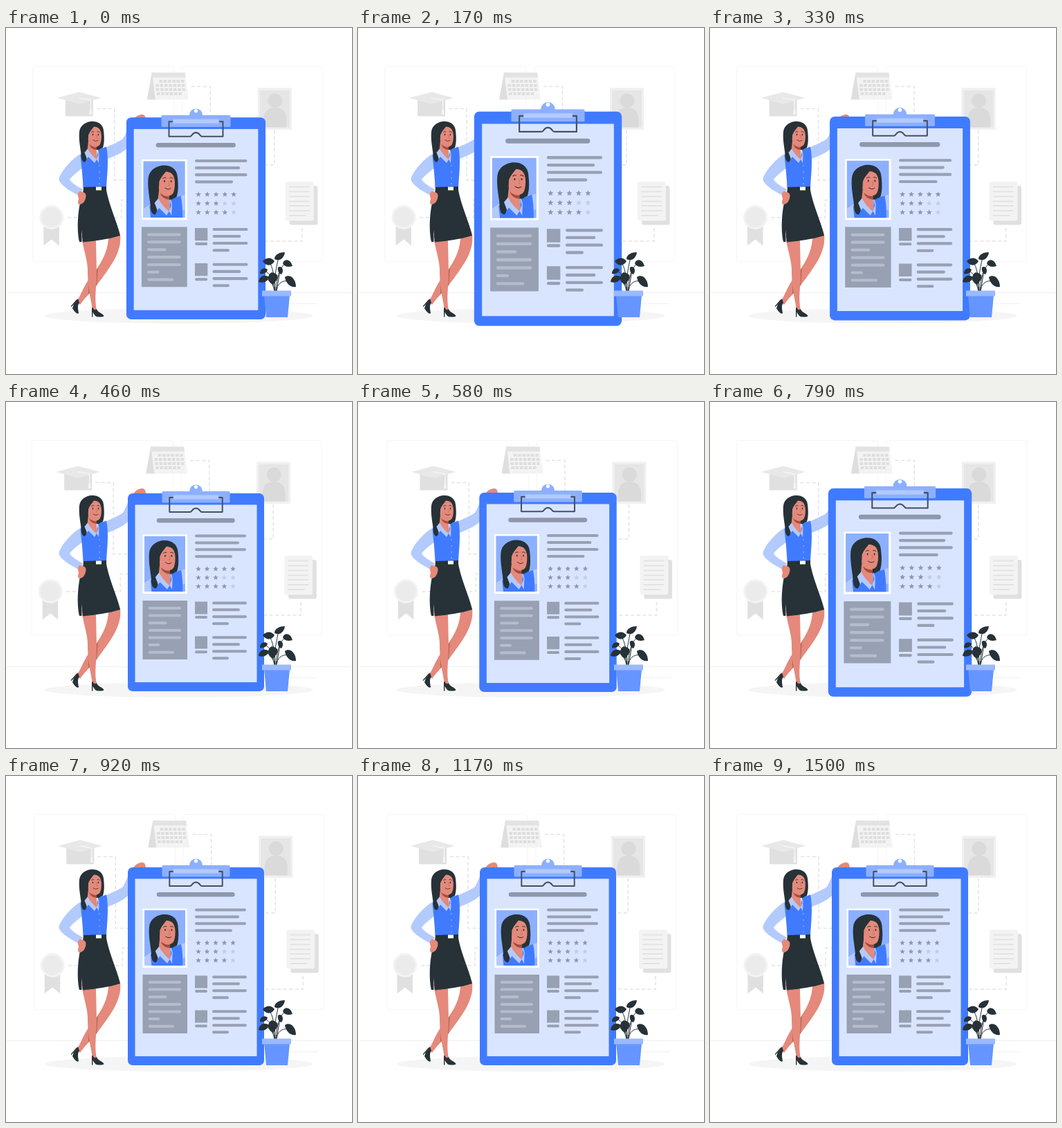
Recreate the animation shown at these times as an HTML page. Size 500 by 500 pixels, loop 1.54 s.

```html
<!DOCTYPE html>
<html lang="en">
<head>
<meta charset="utf-8">
<title>Resume illustration</title>
<style>
  html, body { margin: 0; width: 100%; height: 100%; overflow: hidden; background: #fff; }
  svg { display: block; width: 100%; height: 100%; }
  .line { fill: none; stroke-linecap: round; stroke-linejoin: round; }
  .dash { fill: none; stroke: #e3e3e3; stroke-width: 1.5; stroke-dasharray: 5 3.5; }
  .skin { fill: #e4897b; }
  .dark { fill: #263238; }
  .blue { fill: #407bff; }
  .sleeve { fill: #b3caff; }
  .grey { fill: #98a0b3; }
  .bars { stroke: #98a0b3; stroke-width: 4; }
</style>
</head>
<body>
<svg viewBox="0 0 500 500">
  <defs>
    <clipPath id="photo"><path d="M200 194h59v80h-59z"/></clipPath>
    <path id="star" d="M0-3.9 1.1-1.3 3.8-1.1 1.7.7 2.4 3.4 0 1.9-2.4 3.4-1.7.7-3.8-1.1-1.1-1.3Z"/>
  </defs>

  <g id="backdrop">
    <g fill="none" stroke="#f5f5f5">
      <rect x="39" y="55.5" width="204" height="282" rx="3"/>
      <rect x="255" y="55.5" width="203" height="282" rx="3"/>
      <path d="M0 382.5h500M380 398.5h69" stroke="#f0f0f0"/>
    </g>
    <path class="dash" d="M131 116.5h26V220h20M268 84.5h27.500V130M388 148v50h-17M89 274h78v-25.500h12M428 289v19h-58"/>

    <g id="cap">
      <path d="M86 103h40v24.500H86z" fill="#e0e0e0"/>
      <path d="M74 101 106 92.500 138 101 106 110Z" fill="#e8e8e8"/>
      <path class="line" d="M106 101 122.500 104V123" stroke="#f5f5f5" stroke-width="1.500"/>
      <path d="M121.500 117h2l1 8h-4z" fill="#f5f5f5"/>
    </g>

    <g id="calendar">
      <path d="M211 64.500 204 103.500H217L259 66Z" fill="#dedede"/>
      <path d="M212 70H259.500L264 103.500H216Z" fill="#f3f3f3"/>
      <path d="M211 64.500H259L260 71.500H210Z" fill="#e3e3e3"/>
      <path d="M221.500 77h36M216.500 83h42M217 89h42M218 95h36" fill="none" stroke="#dedede" stroke-width="4" stroke-dasharray="4.600 1.700"/>
    </g>

    <g id="portrait">
      <path d="M364 86.500h49V147h-49z" fill="#f0f0f0"/>
      <path d="M367 90h43v53.500h-43z" fill="#e6e6e6"/>
      <circle cx="389" cy="105" r="10.500" fill="#dadada"/>
      <path d="M372.500 143.500V131C373 121 379 115 389 115S405 121 405.500 131V143.500Z" fill="#dadada"/>
    </g>

    <g id="papers">
      <rect x="410" y="228" width="40.500" height="56.500" rx="3" fill="#e0e0e0"/>
      <rect x="404" y="222" width="41" height="56.500" rx="3" fill="#f3f3f3"/>
      <path class="line" d="M410 229.500h28m-28 7h28m-28 7h28m-28 7h28m-28 6.500h28m-28 7h28m-28 7h23" stroke="#e3e3e3" stroke-width="2"/>
    </g>

    <g id="medal">
      <path d="M54.500 285H77V314.500L66 305.500 54.500 314.500Z" fill="#e0e0e0"/>
      <circle cx="66" cy="273.500" r="16" fill="#ebebeb" stroke="#f3f3f3" stroke-width="3"/>
    </g>
  </g>

  <ellipse cx="249.500" cy="416" rx="194" ry="11" fill="#f5f5f5"/>

  <g id="woman">
    <path class="skin" d="M165 298C168 324 151 345 131 372 120 385 113 391 107 400L102 395C108 387 110 378 119 364 135 344 147 327 148 303Z"/>
    <path d="M119 364Q127 355 133 347L131 372 119 385Z" fill="#b8675c"/>
    <path class="skin" d="M109 300 130 304C130 330 132 350 130 375 129 390 129 398 131 407L125 408C124 395 118 380 118 350 118 335 112 322 109 300Z"/>
    <path class="dark" d="M104 391 98 399 96 405C100 412 104 414 105 412 104 405 103 401 106 397ZM125 403C127 409 130 407 131 406 132 411 141 413 141.500 416 141 418 131 418 129 416L124 409Z"/>
    <path class="line" d="M102.500 393 94.500 402M124.700 405V417" stroke="#263238" stroke-width="1.400"/>
    <path class="dark" d="M112 234H145C149 257 162 284 165 300 148 305 130 308 111 309.500L109 292 109.500 309H106C102 292 103 260 112 234Z"/>
    <path class="skin" d="M184 133C187 127 193 125 197 125 201 125 202 129 202 134Z"/>

    <g id="bust">
      <path class="sleeve" d="M143 173C154 168 164 164 169 160 173 154 175 146 180 137L190 142 184 166C173 178 159 185 144 190ZM110 181C98 186 79 207 76.500 218 76 226 96 238 106 242L111 233C104 230 95 224 92 219 96 213 105 207 113 200Z"/>
      <path class="blue" d="M107.500 184 118 175 131 190 133 176 145 171.500C149 190 146 212 145 231H111.500C111 215 109 200 107.500 184Z"/>
      <path class="dark" d="M121 135.300C131 133.500 140 138 141 148 142 157 142.500 165 140 173L134 176 120 177C114 183 119 189 114 194 108 193 109 186 108 178 107 170 105 160 106 150 107 142 113 137 121 135.300Z"/>
      <path class="skin" d="M119 163 131 168V177L132.500 190Q122 185 117.500 177Z"/>
      <path d="M120 168Q126 173 131 172V176Q123 176 120 168Z" fill="#a24e3f"/>
      <path class="skin" d="M117 149C120 142 128 140 136 146 138.500 152 138.500 162 136 168 133 173 127 172 122 169 118 165 117 157 117 149Z"/>
      <path class="dark" d="M114 172C112 158 113 143 127 138 137 138 139 146 138 153 137 147 133 142 128 141 124 147 121 149 119 155 119 163 118 170 114 180Z"/>
      <path class="sleeve" d="M113.500 180 118 174.500Q123 184 131 190L128 195 119 186 117 189ZM131 190 133.500 183 132 175.500Q134 177 134.500 182L134 195Z"/>
      <g class="dark"><ellipse cx="125.500" cy="154" rx=".8" ry="1.200"/><ellipse cx="133.500" cy="154" rx=".8" ry="1.200"/></g>
      <path class="line" d="M123.500 150.500Q125 149 127 149.700M132 149.700Q134 149 135.500 150.500M126 162Q130 165 133 162.500" stroke="#263238" stroke-width=".8"/>
      <path class="line" d="M130.500 154 131.500 159H130" stroke="#c96e60" stroke-width=".7"/>
    </g>

    <path class="line" d="M135 199v0m.3 9v0m0 9v0m-.3 8v0" stroke="#b3caff" stroke-width="1.500"/>
    <path class="dark" d="M112 230 145 229V235H111.500Z"/>
    <path d="M130 229.500h8v5h-8z" fill="#fff"/>
    <path class="skin" d="M106 236C111 236 116 238 115.500 243 115 250 111 255 106 255 103 254 104 250 105 247L103.500 240Z"/>
  </g>

  <g id="board">
    <rect class="blue" x="176" y="132" width="197" height="286" rx="7"/>
    <path d="M186.500 148.500h176V405h-176z" fill="#d9e5ff"/>
    <path d="M265 130V129a9.500 9.500 0 0 1 19 0v1z" fill="#8cb0ff"/>
    <circle cx="274.500" cy="122.800" r="2.600" fill="#fff"/>
    <rect x="225.500" y="129" width="98" height="16.500" rx="1.500" fill="#8cb0ff"/>
    <path d="M242 134.500h65v6h-65z" fill="#b3caff"/>
    <path class="line" d="M241 138H236.300V159H266C269 159 269 153.500 274.500 153.500S280 159 283 159H312.700V138H308" stroke="#455064" stroke-width="2"/>
    <path class="line" d="M221 171.300H327.500" stroke="#8f97ac" stroke-width="6.400"/>

    <path d="M197.500 191.500h64.500V277h-64.500z" fill="#fff"/>
    <path d="M200 194h59v80h-59z" fill="#8cb0ff"/>
    <g clip-path="url(#photo)">
      <use href="#bust" transform="translate(207 200) scale(1.180) translate(-106 -135)"/>
    </g>

    <path class="line bars" d="M275 193.500h70m-70 10h60m-60 9.800h70m-70 10h50"/>
    <g id="stars"></g>

    <path class="grey" d="M197.500 287H262V372H197.500ZM273 288.500h18v18h-18zM273 338.500h18v18h-18z"/>
    <path class="line" d="M207.500 298h43.500m-43.500 10.500h43.500m-43.500 10.700h23m-23 10.700h43.500m-43.500 10.600h43.500m-43.500 10.600h13m-13 10.600h33.500" stroke="#b5bccc" stroke-width="4"/>
    <path class="line bars" d="M275 311h14m-14 50.300h14M300 290.500h46m-46 9.800h36m-36 9.900h46m-46 10h20m-20 20h46m-46 10h36m-36 10h46m-46 10h20"/>
  </g>

  <g id="plant">
    <path class="line" d="M389 381C387 360 391 345 394 331M389 381C388 360 386 345 380 338M390 381C391 360 396 343 406 339M390 381C392 372 396 363 412 366M388 381C386 358 378 351 372 351M388 381C387 372 382 361 372 363M391 381 396 350" stroke="#263238" stroke-width="1"/>
    <path class="dark" d="M388 334C388 327 396 324 403 324 402 332 396 338 388 334ZM371 337C376 331 384 331 388 337 384 344 376 345 371 337ZM400 340C402 333 411 333 414 344 408 346 402 345 400 340ZM367 355C367 348 373 345 378 349 377 354 372 356 367 355ZM365 367C366 359 373 355 380 360 378 367 372 369 365 367ZM386 371C376 366 378 356 384 353 393 355 397 359 386 371ZM393 346C398 342 403 350 398 356 394 355 392 350 393 346ZM403 360C409 355 419 361 419 374 411 376 404 368 403 360Z"/>
    <path d="M373 386H410L407 418H376Z" fill="#6695ff"/>
    <path d="M370 379.500H412V387.500H370Z" fill="#9ab9ff"/>
  </g>
</svg>

<script>
const find = id => document.getElementById(id);
const LOOP = 1540, CYCLE = 1500, LEAD = 30;

// [progress in %, value], linear in between
const beat = [[0, 1], [10, 1.1], [30, 1], [40, 1], [50, 1.1], [60, 1], [100, 1]];
const shake = [[0, 0], [10, -1], [20, 2], [30, -4], [40, 4], [50, -4], [60, 4], [70, -4], [80, 2], [90, -1], [100, 0]];

function sample(keys, p) {
  const i = Math.max(1, keys.findIndex(([at]) => at >= p));
  const [p0, v0] = keys[i - 1], [p1, v1] = keys[i];
  return v0 + (v1 - v0) * (p - p0) / (p1 - p0);
}

find('stars').innerHTML = [5, 3, 4].map((score, row) =>
  Array.from({ length: 5 }, (_, i) =>
    `<use href="#star" x="${278 + i * 12.5}" y="${241 + row * 12.7}" fill="${i < score ? '#8f97ac' : '#c3cde3'}"/>`
  ).join('')).join('');

const start = performance.now();

function draw() {
  const t = (performance.now() - start) % LOOP;
  const p = Math.min(t + LEAD, CYCLE) / CYCLE * 100;
  find('backdrop').setAttribute('transform', `translate(${sample(shake, p)} 0)`);
  find('board').setAttribute('transform',
    `translate(274.5 268.7) scale(${sample(beat, p)}) translate(-274.5 -268.7)`);
  requestAnimationFrame(draw);
}
draw();
</script>
</body>
</html>
```
